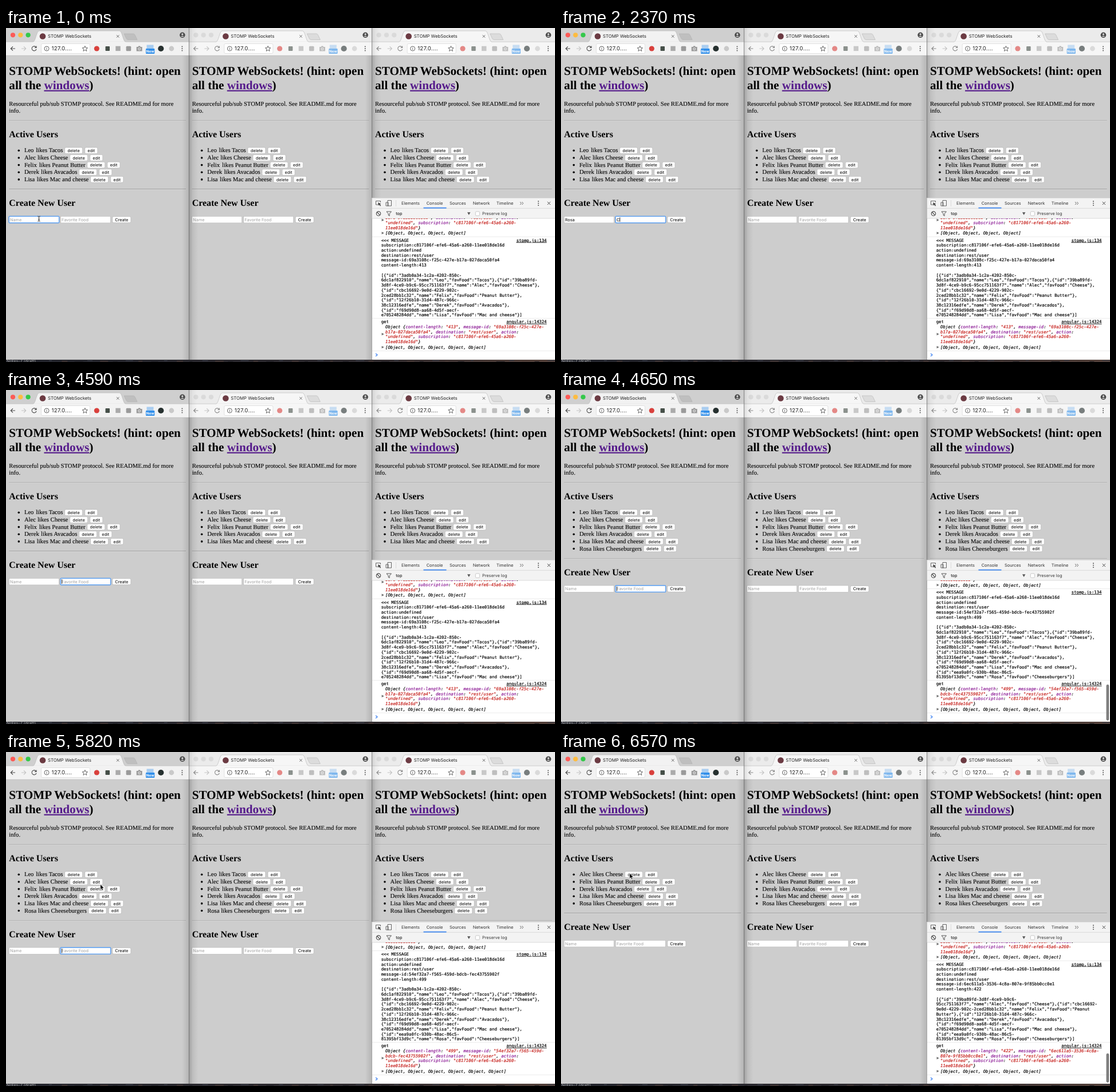
An HTML page that plays this animation: 958 px wide and 584 px high, repeating every 6780 ms.

```html
<!DOCTYPE html>
<html lang="en">
<head>
<meta charset="utf-8">
<title>STOMP WebSockets</title>
<style>
  html, body { margin: 0; width: 100%; height: 100%; overflow: hidden; background: #ccc; }
  svg { display: block; width: 958px; height: 584px; }
  text { font-family: Inter, "Open Sans", sans-serif; font-size: 7.3px; text-rendering: geometricPrecision; white-space: pre; }
  .serif { font-family: "Liberation Serif", "Times New Roman", serif; font-size: 10.64px; stroke: #000; stroke-width: .1px; }
  .h1 { font-size: 21.16px; font-weight: bold; stroke: none; }
  .h2 { font-size: 15.97px; font-weight: bold; stroke: none; }
  .mono { font-family: "DejaVu Sans Mono", monospace; font-size: 7.31px; fill: #000; stroke: #000; stroke-width: .18px; }
  .obj { font-style: italic; }
  .key { fill: #881391; stroke: #881391; }
  .str { fill: #c41a16; stroke: #c41a16; }
  .end { text-anchor: end; }
  .mid { text-anchor: middle; }
  .link { text-decoration: underline; }
</style>
</head>
<body>
<svg viewBox="0 0 958 584" id="stage">
  <defs>
    <linearGradient id="shadeL"><stop offset="0" stop-opacity=".24"/><stop offset=".4" stop-opacity=".08"/><stop offset="1" stop-opacity="0"/></linearGradient>
    <linearGradient id="shadeR"><stop offset="0" stop-opacity="0"/><stop offset="1" stop-opacity=".12"/></linearGradient>
    <linearGradient id="press" x2="0" y2="1"><stop offset="0" stop-color="#4a8df0"/><stop offset="1" stop-color="#1a55d0"/></linearGradient>
    <linearGradient id="desk"><stop offset="0" stop-color="#23252d"/><stop offset=".65" stop-color="#2e2a2e"/><stop offset="1" stop-color="#54413a"/></linearGradient>
    <clipPath id="logClip"><path d="M639 333H958V580H639Z"/></clipPath>
  </defs>
  <g id="base"></g><g id="lists"></g><g id="forms"></g><g id="shades"></g><g id="tools"></g><g id="log"></g>
  <rect id="thumb" x="951.5" width="4.8" rx="2.4" fill="#7e7e7e"/>
  <g id="beam" fill="none" stroke="#222" stroke-width=".9"><path d="M-2.2 -4.5Q0 -4.5 0 -3V3Q0 4.5 -2.2 4.5M2.2 -4.5Q0 -4.5 0 -3V3Q0 4.5 2.2 4.5M-1.2 1.5H1.2"/></g>
  <path id="arrow" d="M0 0V9.4L2.1 7.5L3.7 11L5.3 10.3L3.8 6.9H6.7Z" fill="#000" stroke="#fff" stroke-width=".7"/>
</svg>
<script>
const LOOP = 6780, COL = 319.33, ROW = 12.65, LINE = 8.72;
const $ = id => document.getElementById(id);

// name, food, centre of the delete button, id
const users = [
  ["Leo", "Tacos", 118, "3adb0a34-1c2a-4202-850c-6dc1af822910"],
  ["Alec", "Cheese", 127, "39ba89fd-3d8f-4ce9-b9c6-95cc751163f7"],
  ["Felix", "Peanut Butter", 157.2, "cbc16692-9e0d-4229-902c-2ced28bb1c32"],
  ["Derek", "Avacados", 143, "12f26b10-31d4-487c-966c-38c12316edfe"],
  ["Lisa", "Mac and cheese", 163, "f69d90d8-aa68-4d5f-aecf-e705248284dd"],
  ["Rosa", "Cheeseburgers", 159.6, "eea9a0fc-930b-48ac-86c5-81395bf13d9c"]
];
const views = [users.slice(0, 5), users, users.slice(1)];
const messages = [
  { size: 413, id: "69a3108c-f25c-427e-b17a-027daca50fa4", before: 4 },
  { size: 499, id: "54ef32a7-f565-459d-bdcb-fec43755902f", before: 5 },
  { size: 422, id: "6ec611a5-3536-4c8a-807e-9f85bb0cc0e1", before: 6 }
];
const nameKeys = [840, 1020, 1140, 1290];
const foodKeys = [2370, 2580, 2640, 2790, 3000, 3060, 3540, 3720, 3780, 3960, 4050, 4140, 4440];
const arrowPath = [[5070, 57, 331], [5220, 62.7, 334.3], [5730, 150, 239], [5880, 172.5, 227], [6120, 172.5, 227], [6390, 119.7, 212]];

const text = (x, y, s, cls = "", more = "") => `<text x="${x}" y="${y}" class="${cls}" ${more}>${s}</text>`;
const rect = (x, y, w, h, fill, more = "") => `<rect x="${x}" y="${y}" width="${w}" height="${h}" fill="${fill}" ${more}/>`;
const disc = (x, y, r, fill, more = "") => `<circle cx="${x}" cy="${y}" r="${r}" fill="${fill}" ${more}/>`;
const line = (d, color, w = 1) => `<path d="${d}" fill="none" stroke="${color}" stroke-width="${w}"/>`;
const columns = draw => [0, 1, 2].map(i => `<g transform="translate(${COL * i})">${draw(i)}</g>`).join("");
const rule = y => rect(5.3, y, 308.7, .7, "#8e8e8e") + rect(5.3, y + .7, 308.7, .6, "#dedede");

function button(cx, cy, w, label, down) {
  return rect(cx - w / 2, cy - 5.2, w, 10.6, down ? "url(#press)" : "#fff", 'rx="2" stroke="#a9a9a9" stroke-width=".5"') +
    text(cx, cy + 2.8, label, "mid", down ? 'fill="#06123f"' : "");
}

function browser(i) {
  const on = i === 0, ink = on ? "#4a4a4a" : "#8a8a8a";
  const lights = on ? ["#fc5b57", "#fdbc40", "#34c84a"] : ["#dadada", "#dadada", "#dadada"];
  const tint = on ? "" : 'opacity=".6"';
  const bar = on ? "#f2f2f2" : "#f6f6f6";
  let s = rect(0, 0, 320, 25, on ? "#cfcfcf" : "#ebebeb") + rect(0, 24, 320, 24, bar);
  s += lights.map((c, k) => disc(12 + 13.3 * k, 12.3, 4.1, c)).join("");
  s += `<path d="M47 24.3C52 24 53 5 58 5H198C203 5 204 24 209 24.3Z" fill="${bar}" stroke="#b4b4b4" stroke-width=".6"/>`;
  s += rect(47.5, 24, 161, 1, bar);
  s += line("M0 24.2H47M209 24.2H320", "#b4b4b4", .6);
  s += `<path d="M206 10H222Q224 10 225 12L229 20.5H213Q211 20.5 210 18.5Z" fill="${on ? "#bfbfbf" : "#dcdcdc"}" stroke="#aaa" stroke-width=".5"/>`;
  s += disc(64, 14.5, 5.3, "#6b3a42");
  s += text(73, 17.3, "STOMP WebSockets", "", 'style="font-size:7.8px" fill="#222"');
  s += line("M193 12.3L197.4 16.7M197.4 12.3L193 16.7", "#555", .9);
  s += disc(307.8, 12.3, 4.8, "#4b4b4b") + disc(307.8, 10.8, 1.6, "#ddd") + `<path d="M304.8 15.2Q307.8 11.8 310.8 15.2Z" fill="#ddd"/>`;
  s += line("M16 36H8.5M12 32.3L8.3 36L12 39.7", ink, 1.2) + line("M27 36H34.5M31 32.3L34.7 36L31 39.7", "#c4c4c4", 1.2);
  s += line("M52.4 33.5A4 4 0 1 0 53 37M53 31.6V34.4H50.2", ink, 1.1);
  s += rect(61.5, 27.5, 85, 17, "#fff", 'rx="2" stroke="#d0d0d0" stroke-width=".6"');
  s += disc(71, 36, 4, "none", 'stroke="#555" stroke-width=".9"') + line("M71 35.3V38.3M71 33.5V34.5", "#555", .9);
  s += text(79.5, 39.4, "127.0....", "", 'style="font-size:9.6px;letter-spacing:.25px" fill="#222"');
  s += `<path d="M137.8 31.4L139.1 34.6L142.5 34.8L139.9 37L140.7 40.4L137.8 38.5L134.9 40.4L135.7 37L133.1 34.8L136.5 34.6Z" fill="none" stroke="#555" stroke-width=".9"/>`;
  s += `<g ${tint}>` + disc(158.3, 36, 4.6, "#d9403c") + rect(173.5, 32, 7.5, 8, "#454f48", 'rx="1"');
  s += rect(191.3, 31.7, 8.4, 8.4, "#aaa") + rect(209.6, 31.7, 8.6, 8.6, "#9a9a9a", 'rx="1.5"');
  s += `<path d="M227.7 33H230.5L231.2 31.6H234L234.7 33H237.6V40.5H227.7Z" fill="#999"/>` + disc(232.6, 36.6, 2.4, "#eee") + disc(232.6, 36.6, 1.4, "#999");
  s += rect(245.5, 29.5, 12, 9, "#a9cdf0") + rect(244, 36, 15.3, 9, "#2f8eea", 'rx="1"');
  s += text(251.6, 43, "New", "mid", 'fill="#fff" style="font-size:6.3px;font-weight:bold"');
  s += disc(270.3, 36, 5.1, "#26302f") + disc(288.8, 36, 4.4, "#c9c9c9") + "</g>";
  s += [32.4, 36, 39.6].map(y => disc(307.4, y, 1, "#555")).join("");
  return s + line("M0 48.2H320", "#b8b8b8", .6);
}

function page(i) {
  return rect(0, 0, 319.4, 580, "#cdcdcd") + browser(i) +
    text(5.3, 82, "STOMP WebSockets! (hint: open", "serif h1") +
    text(5.3, 106.7, 'all the <tspan class="link" fill="#551a8b">windows</tspan>)', "serif h1") +
    text(5.3, 135.9, "Resourceful pub/sub STOMP protocol. See README.md for more", "serif") +
    text(5.3, 148, "info.", "serif") + rule(161) +
    text(5.3, 190.5, "Active Users", "serif h2");
}

// Window shadows, softer over the toolbars
function shade(i) {
  const left = i ? rect(0, 0, 14, 48, "url(#shadeL)", 'opacity=".5"') + rect(0, 48, 16, 532, "url(#shadeL)", `opacity="${1.1 - i * .15}"`) : "";
  return left + (i < 2 ? rect(307, 48, 12.3, 532, "url(#shadeR)") + rect(318.9, 0, .8, 580, "#777") : "");
}

function desktop() {
  let s = rect(0, 580, 958, 4, "url(#desk)");
  for (let k = 0; k < 40; k++) s += rect(75 + k * 22.3, 581 + k * 7 % 3, 5 + k * 5 % 11, 1.2, ["#3b3f4a", "#4a3a34", "#1a1a1f"][k % 3]);
  return s + text(1, 584.5, "Notes-7 (draft)", "", 'fill="#aaa"');
}

function list(view, down) {
  const end = 208 + ROW * view.length;
  return columns(i => view.map(([name, food, cx], r) => {
    const y = 214.1 + ROW * r;
    return disc(22.3, y + .2, 1.8, "#000") + text(31.9, y + 3.2, name, "serif") +
      text(cx - 18.7, y + 3.2, "likes " + food, "serif end") +
      button(cx, y, 30.8, "delete", down && !i && !r) + button(cx + 30.7, y, 22, "edit");
  }).join("") + rule(end + 10.1) + text(5.3, end + 39.7, "Create New User", "serif h2"));
}

const pen = document.createElement("canvas").getContext("2d");
function field(x, y, hint, value, focus, caret) {
  pen.font = "7.3px Inter, 'Open Sans', sans-serif";
  let s = focus ? rect(x - .9, y - 6.5, 89, 13, "#5c9ff0", 'rx="2.2"') + rect(x + .6, y - 5, 86, 10, "#fff")
    : rect(x, y - 5.7, 87, 11.6, "#fff", 'stroke="#b5b5b5" stroke-width=".6"');
  s += text(x + 1.7, y + 2.8, value || hint, "", value ? "" : 'fill="#a2a2a2"');
  if (caret) s += rect(x + 1.8 + pen.measureText(value).width, y - 4, .8, 8, "#000");
  return s;
}

function forms(view, name, food, focus, caret) {
  const y = 271.7 + ROW * view.length;
  return columns(i => {
    const f = i ? 0 : focus;
    return field(5.3, y, "Name", i ? "" : name, f === 1, f === 1 && caret) +
      field(95.3, y, "Favorite Food", i ? "" : food, f === 2, f === 2 && caret) + button(201.8, y, 32, "Create");
  });
}

function devtools() {
  let s = rect(638.7, 297, 319.3, 283, "#fff") + rect(638.7, 297, 319.3, 36, "#f3f3f3");
  s += line("M638.7 297.2H958M638.7 315.3H958M638.7 333H958", "#c6c6c6", .6) + rect(728.5, 313.7, 40, 1.8, "#3f87f0");
  s += line("M651 309H645.5V302.5H653.5V305", "#555", .9) + `<path d="M649 305L654.5 307.5L652.5 308.3L654.3 310.6L653 311.5L651.3 309L650 310.6Z" fill="#444"/>`;
  s += line("M666 301.5H672.5V311H666ZM663 305H667V311H663Z", "#555", .9) + line("M680.5 301V312", "#ccc", .6);
  s += [["Elements", 690], ["Console", 733.7], ["Sources", 774], ["Network", 814.7], ["Timeline", 855.8]]
    .map(([t, x]) => text(x, 309.2, t, "", 'fill="#333" style="font-size:7.4px"')).join("");
  s += line("M897 304L899.3 306.5L897 309M900.3 304L902.6 306.5L900.3 309", "#555", .9);
  s += [303, 306.5, 310].map(y => disc(929, y, .9, "#444")).join("") + line("M944.8 303.8L950 309M950 303.8L944.8 309", "#444", 1);
  s += disc(650, 324.6, 3.7, "none", 'stroke="#444" stroke-width="1.1"') + line("M647.4 322L652.6 327.2", "#444", 1.1);
  s += line("M664 321H672.4L669.2 324.8V328.5L667.2 327.3V324.8Z", "#444", .9);
  s += text(680.3, 327.2, "top") + `<path d="M805 322.3H810.4L807.7 327Z" fill="#555"/>`;
  s += rect(819.3, 321, 7.2, 7.2, "#fff", 'rx="1.5" stroke="#aaa" stroke-width=".6"') + text(831, 327.2, "Preserve log", "", 'fill="#333"');
  return s;
}

function wrap(s, width) {
  const rows = [""];
  for (const part of s.split(/(?<=[- ]|\},)/)) {
    if ((rows[rows.length - 1] + part).trimEnd().length > width) rows.push("");
    rows[rows.length - 1] += part;
  }
  return rows;
}

const key = s => `<tspan class="key">${s}</tspan>: `;
const str = s => `<tspan class="str">${s}</tspan>`;
const mono = (x, c, s, cls = "") => text(x, c + 2.6, s, "mono " + cls);
const mark = c => `<path d="M655.6 ${c - 2.2}L659.8 ${c}L655.6 ${c + 2.2}Z" fill="#6e6e6e"/>`;
const split = y => line(`M639 ${y}H958`, "#dedede", .6);

function objectBlock(top, m, count) {
  return [
    `Object {${key("content-length")}${str(`"${m.size}"`)}, ${key("message-id")}${str('"' + m.id.slice(0, 19))}`,
    `${str(m.id.slice(19) + '"')}, ${key("destination")}${str('"rest/user"')}, ${key("action")}`,
    `${str('"undefined"')}, ${key("subscription")}${str('"c817106f-efe6-45a6-a260-')}`,
    `${str('11ee018de16d"')}}`
  ].map((s, i) => mono(662, top + LINE * i, s, "obj")).join("") + mark(top + 12.9) + mark(top + 35.7) +
    mono(662, top + 35.7, "[" + Array(count).fill("Object").join(", ") + "]", "obj");
}

function log(n) {
  const m = messages[n];
  const json = JSON.stringify(views[n].map(([name, favFood, , id]) => ({ id, name, favFood })));
  const rows = ["&lt;&lt;&lt; MESSAGE", "subscription:c817106f-efe6-45a6-a260-11ee018de16d", "action:undefined",
    "destination:rest/user", "message-id:" + m.id, "content-length:" + m.size, "", ...wrap(json, 65)];
  const top = 501.8 - LINE * (rows.length - 1);
  return `<g clip-path="url(#logClip)">` + objectBlock(top - 48.2, messages[(n + 2) % 3], m.before) + split(top - 6) +
    rows.map((s, i) => mono(654.7, top + LINE * i, s)).join("") + mono(943.5, top, "stomp.js:134", "end link") +
    split(507.7) + mono(654.7, 513.6, "get") + mono(943.5, 513.6, "angular.js:14324", "end link") +
    objectBlock(522.4, m, m.before === 6 ? 5 : m.before + 1) + split(564.6) + line("M645 569.3L648 571.6L645 573.9", "#3a7ff0", 1.2) + "</g>";
}

const shown = {};
function put(id, state, draw) {
  const k = state.join("|");
  if (shown[id] !== k) { shown[id] = k; $(id).innerHTML = draw(); }
}

const typed = (s, keys, t) => s.slice(0, keys.filter(k => t >= k).length);
const within = (t, a, b) => t >= a && t < b;

function along(path, t) {
  let i = 0;
  while (i < path.length - 2 && t >= path[i + 1][0]) i++;
  const [a, b] = [path[i], path[i + 1]];
  const u = Math.min(1, Math.max(0, (t - a[0]) / (b[0] - a[0]))), e = u * u * (3 - 2 * u);
  return [a[1] + (b[1] - a[1]) * e, a[2] + (b[2] - a[2]) * e];
}

function place(id, visible, x, y) {
  $(id).setAttribute("visibility", visible ? "visible" : "hidden");
  $(id).setAttribute("transform", `translate(${x} ${y})`);
}

function render(time) {
  const t = Math.floor(time % LOOP / 30) * 30;
  const n = t < 4620 ? 0 : t < 6570 ? 1 : 2, entry = t < 4650 ? 0 : n;
  const down = within(t, 6420, 6540);
  put("lists", [n, down], () => list(views[n], down));

  const sent = t >= 4590;
  const name = sent ? "" : typed("Rosa", nameKeys, t), food = sent ? "" : typed("Cheeseburgers", foodKeys, t);
  const focus = t < 1470 ? 1 : t < 6420 ? 2 : 0;
  const caret = within(t, 30, 480) || within(t, 840, 1920) || within(t, 2370, 5070) || within(t, 5520, 5970);
  put("forms", [n, name, food, focus, caret], () => forms(views[n], name, food, focus, caret));
  put("log", [entry], () => log(entry));

  const top = entry === 2 ? 527 : 515;
  $("thumb").setAttribute("y", top);
  $("thumb").setAttribute("height", 578 - top);
  $("thumb").setAttribute("opacity", entry === 0 ? 0 : entry === 2 ? 1 : Math.max(0, Math.min(1, (5340 - t) / 270)));

  place("beam", t < 840, 57.5 + 37 * Math.sin(Math.PI * Math.min(1, t / 690)) ** 2, 333.6);
  place("arrow", t >= 5070, ...along(arrowPath, t));
}

$("base").innerHTML = columns(page) + desktop();
$("shades").innerHTML = columns(shade);
$("tools").innerHTML = devtools();
const start = performance.now();
function tick() {
  render(performance.now() - start);
  requestAnimationFrame(tick);
}
render(0);
requestAnimationFrame(tick);
</script>
</body>
</html>
```
